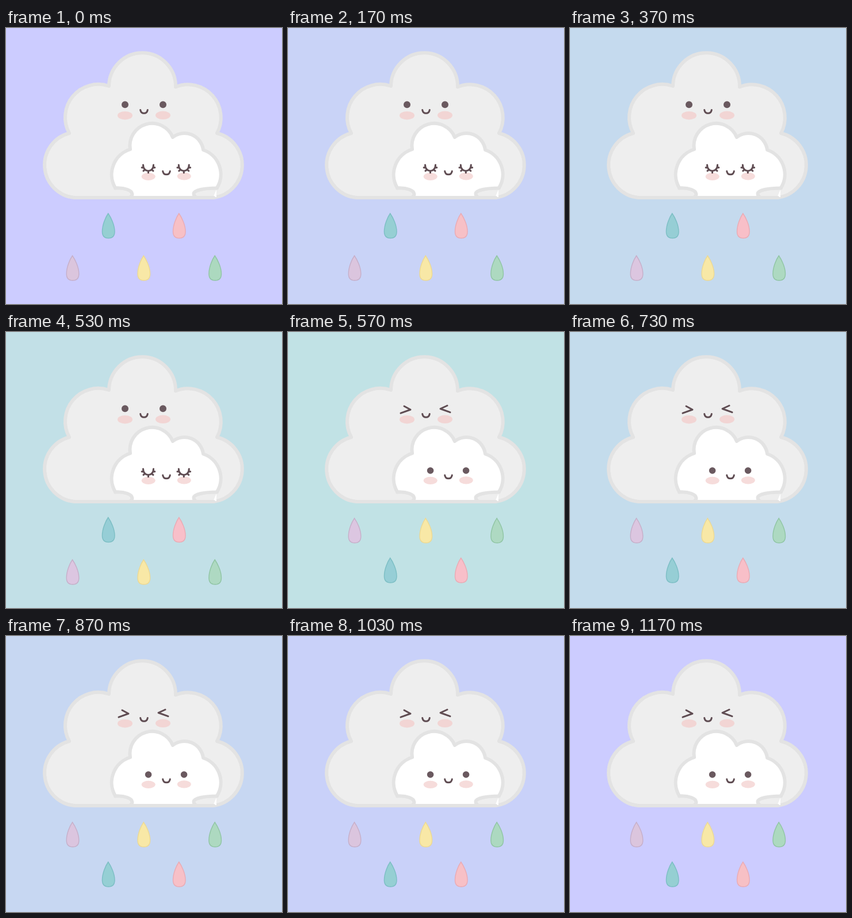
These frames come from a looping animation (480x480 px, 1.21 s). An HTML page:

```html
<!DOCTYPE html>
<html lang="en">
<head>
<meta charset="utf-8">
<title>Rain clouds</title>
<style>
  html, body { margin: 0; width: 100%; height: 100%; overflow: hidden; }
  body { background: #ccf; animation: sky 1210ms linear infinite; }
  svg { display: block; width: 100vw; height: 100vh; }

  .line { fill: none; stroke: #5f4c52; stroke-width: 3; stroke-linecap: round; stroke-linejoin: round; }
  .edge { stroke: #e3e3e3; stroke-width: 6; stroke-linejoin: round; stroke-linecap: round; }
  .dot { fill: #6a595f; }
  .blush { fill: #f2d5d4; }
  .blush.light { fill: #f6dcdb; }

  .rest { animation: rest 1210ms step-end infinite; }
  .giggle { animation: giggle 1210ms step-end infinite; }
  .drop { stroke-width: 1.4; fill: var(--a); animation: tint 1210ms linear infinite; }
  .teal { --a: #95cfd2; --b: #96ced6; stroke: #7cbec4; }
  .pink { --a: #f7c0c5; --b: #f8bfc9; stroke: #eaabb4; }
  .lilac { --a: #dbc5dd; --b: #dcc6e1; stroke: #c6afc9; }
  .lemon { --a: #f8e8a6; --b: #f8e8a6; stroke: #ecd994; }
  .mint { --a: #acd9bf; --b: #aed9c2; stroke: #90c5a4; }

  @keyframes sky {
    0%, 96.694%, 100% { background: #ccf; }
    47.107% { background: #c1e2e5; }
  }
  @keyframes tint {
    0%, 96.694%, 100% { fill: var(--a); }
    47.107% { fill: var(--b); }
  }
  @keyframes rest {
    0% { visibility: visible; }
    47.107%, 100% { visibility: hidden; }
  }
  @keyframes giggle {
    0% { visibility: hidden; }
    47.107%, 100% { visibility: visible; }
  }
</style>
</head>
<body>
<svg viewBox="0 0 480 480">
  <defs>
    <path id="drop" d="M-.5 .5C4 7 10.8 20 10.8 32C10.8 40 6.5 43.5 0 43.5S-10.8 40-10.8 32C-10.8 20-5 7-.5 .5Z"/>
    <path id="smile" d="M-6.3-3C-5 4.8 5 4.8 6.3-3"/>
    <path id="lashes" d="M-9-5C-9 9 9 9 9-5M-8 0L-11.3-.2M-6 3.5L-8.5 5.5M0 5.5V8.8M6 3.5L8.5 5.5M8 0L11.3-.2"/>
  </defs>

  <!-- big cloud -->
  <path class="edge" fill="#eee" d="M119 295A57 57 0 0 1 110 183A57.5 57.5 0 0 1 179 101A58 58.5 0 0 1 295 102.5A57.5 57.5 0 0 1 367 183A57 57 0 0 1 361 295Z"/>
  <g class="blush">
    <ellipse cx="207" cy="152.2" rx="13" ry="7.2"/>
    <ellipse cx="273" cy="151.8" rx="13" ry="7.2"/>
  </g>
  <use href="#smile" class="line" x="240" y="145.5"/>

  <!-- little cloud -->
  <path fill="#fff" d="M190 279L216 211L290 190L343 212L366 279V294H190Z"/>
  <path class="edge" fill="#fff" d="M190 278A46 46 0 0 1 216 211A38.7 38.7 0 0 1 290 190A33 33 0 0 1 343 212A45 45 0 0 1 367 278"/>
  <g class="blush light">
    <ellipse cx="247.7" cy="258.3" rx="12" ry="6.6"/>
    <ellipse cx="309.8" cy="257.8" rx="12" ry="6.6"/>
  </g>
  <use href="#smile" class="line" x="279" y="252"/>

  <!-- hugging arms -->
  <g class="edge" fill="#eee">
    <path d="M190 278.5C206 277.5 219 282 219.5 289Q219.5 293 214 295H190"/>
    <path d="M367 278.5C345 278.5 327 282 326.5 288Q326.5 293 332 295H360"/>
    <path d="M119 295H361"/>
  </g>

  <g class="rest">
    <circle class="dot" cx="207" cy="133.3" r="6"/>
    <circle class="dot" cx="273" cy="133.3" r="6"/>
    <use href="#lashes" class="line" x="247.5" y="243"/>
    <use href="#lashes" class="line" x="309.3" y="243"/>
    <use href="#drop" class="drop teal" x="178.2" y="322"/>
    <use href="#drop" class="drop pink" x="301.3" y="322"/>
    <use href="#drop" class="drop lilac" x="116" y="395.5"/>
    <use href="#drop" class="drop lemon" x="239.8" y="395.5"/>
    <use href="#drop" class="drop mint" x="363.7" y="395.5"/>
  </g>

  <g class="giggle">
    <path class="line" d="M202 129L213 135L196 141.2M277 128L265 133.5L282 139.7"/>
    <circle class="dot" cx="247.6" cy="241" r="5.8"/>
    <circle class="dot" cx="309.6" cy="241" r="5.8"/>
    <use href="#drop" class="drop lilac" x="116" y="323.3"/>
    <use href="#drop" class="drop lemon" x="239.8" y="323.3"/>
    <use href="#drop" class="drop mint" x="363.7" y="323.3"/>
    <use href="#drop" class="drop teal" x="178.2" y="392.5"/>
    <use href="#drop" class="drop pink" x="301.3" y="392.5"/>
  </g>
</svg>
</body>
</html>
```
